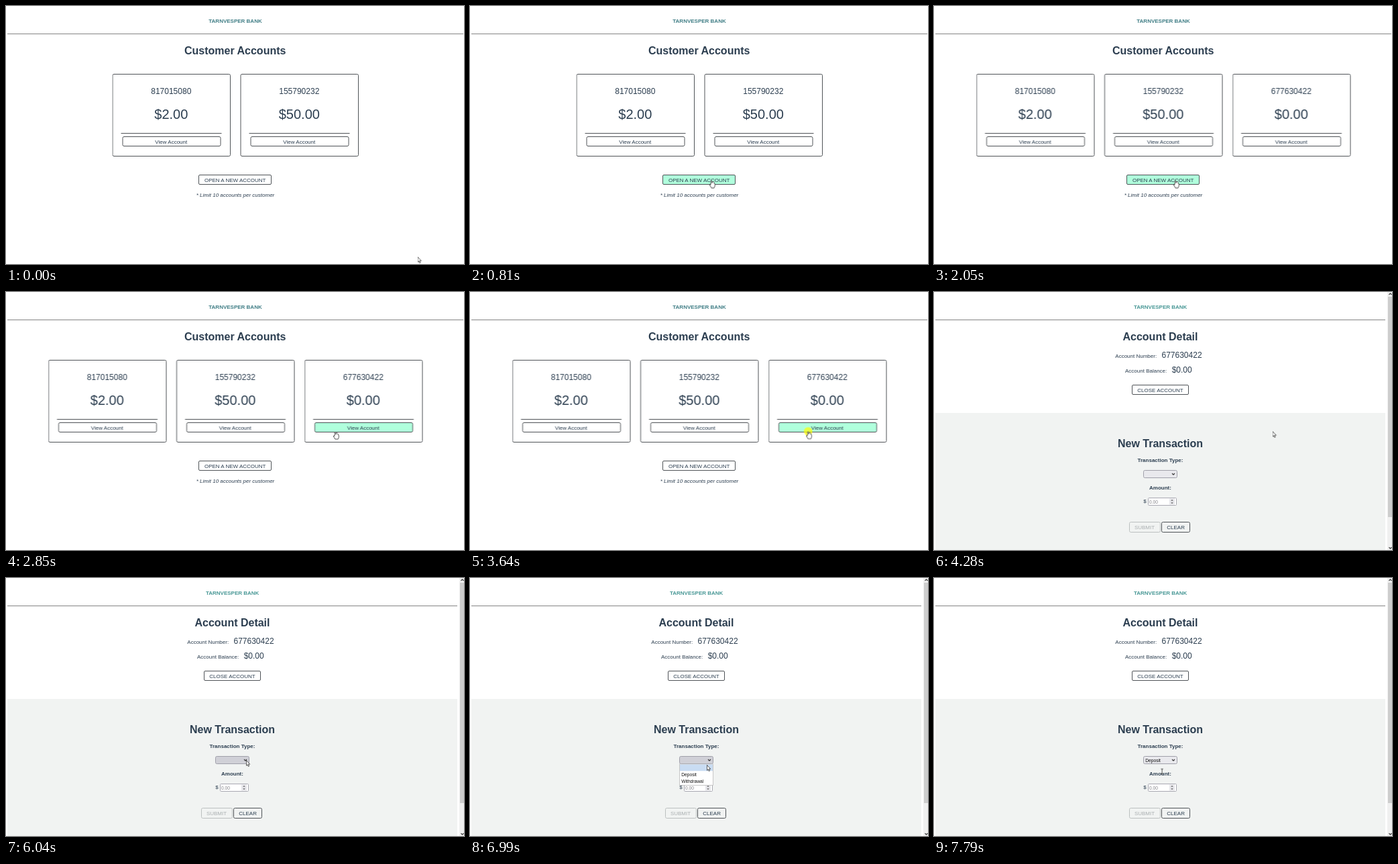
An HTML page for the animation above (8 s loop, 683 by 384 pixels).

```html
<!DOCTYPE html>
<html lang="en">
<head>
<meta charset="utf-8">
<title>Customer accounts</title>
<style>
html, body { margin: 0; width: 100%; height: 100%; overflow: hidden; background: #fff; }
svg { display: block; width: 683px; height: 384px; font: 8px "Liberation Sans", Arial, sans-serif; fill: #2c3e50; }
.mid { text-anchor: middle; }
.brand { font-weight: bold; fill: #3f7d85; }
.detail .brand { fill: #479795; }
h1, .title { font-size: 16px; font-weight: bold; }
.bold { font-weight: bold; }
.number { font-size: 12px; }
.money { font-size: 20px; }
.small { font-size: 6.67px; }
.rule { stroke: #858585; }
.box { fill: #fff; stroke: #505458; }
.clear { fill: none; }
.field { fill: #fff; stroke: #a9a9b2; }
.off { fill: #aaafb1; }
.off-box { fill: none; stroke: #bcc0c0; }
.chevron { fill: none; stroke: #333; stroke-width: 1.1; }

/* One percent of the loop is 80 ms. */
.accounts, .detail, .row, .third, .open, .view, .select, .popup, .mark, .chosen,
.pointer, .arrow, .hand, .beam, .click { animation: 8s step-end infinite; }
.accounts { animation-name: accounts; }
.detail { animation-name: detail; }
.row { animation-name: row; }
.third { animation-name: third; }
.open { animation-name: open; }
.view { animation-name: view; }
.select { fill: #e9e9ed; stroke: #a0a0aa; animation-name: select; }
.popup { animation-name: popup; }
.mark { fill: #c9dcf2; animation-name: mark; }
.chosen { animation-name: chosen; }
.pointer { animation-name: pointer; }
.arrow { animation-name: arrow; }
.hand { animation-name: hand; }
.beam { animation-name: chosen; }
.click { fill: #ff0; fill-opacity: .7; animation-name: click; }

@keyframes accounts { 0% { opacity: 1 } 49.625%, 100% { opacity: 0 } }
@keyframes detail { 0% { opacity: 0 } 49.625%, 100% { opacity: 1 } }
@keyframes row { 0% { transform: translateX(95.5px) } 25.625%, 100% { transform: none } }
@keyframes third { 0% { opacity: 0 } 25.625%, 100% { opacity: 1 } }
@keyframes open { 0%, 31.625%, 100% { fill: #fff } 8.125% { fill: #b0ffdc } }
@keyframes view { 0%, 100% { fill: #fff } 35.625% { fill: #b0ffdc } }
@keyframes select { 0%, 97.375%, 100% { fill: #e9e9ed } 73.375% { fill: #d0d0d7 } }
@keyframes popup { 0%, 97.375%, 100% { opacity: 0 } 77.375% { opacity: 1 } }
@keyframes mark { 0% { transform: none } 91.375%, 100% { transform: translateY(10px) } }
@keyframes chosen { 0% { opacity: 0 } 97.375%, 100% { opacity: 1 } }
@keyframes arrow {
  0%, 31.625%, 49.625% { opacity: 1 }
  8.125%, 35.625%, 97.375%, 100% { opacity: 0 }
}
@keyframes hand {
  0%, 31.625%, 49.625%, 100% { opacity: 0 }
  8.125%, 35.625% { opacity: 1 }
}
@keyframes click {
  0%, 18%, 47.625%, 79.5%, 100% { opacity: 0 }
  16.125%, 45.5%, 77.375% { opacity: 1 }
}
@keyframes pointer {
  0% { transform: translate(613.5px, 373px) }
  2.125% { transform: translate(597px, 365px) }
  4.125% { transform: translate(520px, 325px) }
  6.125% { transform: translate(430px, 282px) }
  8.125% { transform: translate(374px, 262px) }
  10.125% { transform: translate(360px, 259.5px) }
  31.625% { transform: translate(385px, 254px) }
  33.625% { transform: translate(442px, 233px) }
  35.625% { transform: translate(491px, 208px) }
  37.5% { transform: translate(503.5px, 207.5px) }
  41.375% { transform: translate(504.2px, 207.5px) }
  49.625% { transform: translate(504.5px, 207px) }
  59.5% { transform: translate(502px, 202px) }
  61.5% { transform: translate(494px, 199.5px) }
  63.5% { transform: translate(474px, 206px) }
  65.5% { transform: translate(446px, 219px) }
  67.5% { transform: translate(415px, 236px) }
  69.5% { transform: translate(385px, 251px) }
  71.5% { transform: translate(363.5px, 261px) }
  73.375% { transform: translate(358.5px, 270px) }
  75.5% { transform: translate(358px, 271px) }
  85.25% { transform: translate(357px, 273px) }
  87.375% { transform: translate(353px, 278px) }
  89.375% { transform: translate(348px, 283px) }
  91.375% { transform: translate(343px, 286.5px) }
  93.5%, 100% { transform: translate(340px, 287.3px) }
}
</style>
</head>
<body>
<svg viewBox="0 0 683 384">
  <defs>
    <g id="card">
      <rect class="box" x=".5" y="101.5" width="175.5" height="122" rx="2"/>
      <path class="rule" style="stroke:#505458" d="M13 189.5h150"/>
    </g>
    <rect id="button" x="15.5" y="194.5" width="146" height="14" rx="2"/>
  </defs>

  <g class="accounts">
    <text class="brand mid" x="342" y="25">TARNVESPER BANK</text>
    <path class="rule" d="M2 41.5H682"/>
    <text class="title mid" x="341.7" y="72">Customer Accounts</text>
    <g class="row mid">
      <g transform="translate(63)">
        <use href="#card"/><use href="#button" class="box"/>
        <text class="number" x="87.8" y="130.5">817015080</text>
        <text class="money" x="87.8" y="168">$2.00</text>
        <text x="87.8" y="204.5">View Account</text>
      </g>
      <g transform="translate(254)">
        <use href="#card"/><use href="#button" class="box"/>
        <text class="number" x="87.8" y="130.5">155790232</text>
        <text class="money" x="87.8" y="168">$50.00</text>
        <text x="87.8" y="204.5">View Account</text>
      </g>
      <g class="third"><g transform="translate(445)">
        <use href="#card"/><use href="#button" class="box view"/>
        <text class="number" x="87.8" y="130.5">677630422</text>
        <text class="money" x="87.8" y="168">$0.00</text>
        <text x="87.8" y="204.5">View Account</text>
      </g></g>
    </g>
    <rect class="box open" x="287.5" y="251.5" width="108" height="14" rx="1.5"/>
    <text class="mid" x="341.7" y="261.5">OPEN A NEW ACCOUNT</text>
    <text class="mid" x="342" y="283.5" font-style="italic">* Limit 10 accounts per customer</text>
  </g>

  <g class="detail">
    <text class="brand mid" x="337.7" y="25">TARNVESPER BANK</text>
    <path class="rule" d="M2 41.5H673"/>
    <text class="title mid" x="337.5" y="72">Account Detail</text>
    <text x="270.3" y="98">Account Number:</text>
    <text class="number" x="339.5" y="98">677630422</text>
    <text x="285" y="120">Account Balance:</text>
    <text class="number" x="354.7" y="120">$0.00</text>
    <rect class="box" x="295.5" y="138.5" width="84" height="14" rx="1.5"/>
    <text class="mid" x="337.5" y="148.5">CLOSE ACCOUNT</text>

    <path fill="#f1f3f2" d="M2 180H673V384H2z"/>
    <text class="title mid" x="337.5" y="231">New Transaction</text>
    <text class="bold mid" x="337.5" y="253">Transaction Type:</text>
    <rect class="select" x="312.5" y="265.5" width="50" height="11" rx="2"/>
    <path class="chevron" d="M355 270l2 2 2-2"/>
    <text class="small chosen" x="315.3" y="273.5" fill="#111">Deposit</text>
    <text class="bold mid" x="337.5" y="294">Amount:</text>
    <text x="312.3" y="314">$</text>
    <rect class="field" x="319.5" y="306.5" width="42" height="11" rx="1"/>
    <text class="small" x="321" y="314.5" fill="#85858a">0.00</text>
    <path fill="#e6e6ea" d="M351 307.5h8v9h-8z"/>
    <path fill="#666" d="M353.3 310.8l1.7-2 1.7 2zM353.3 313.3l1.7 2 1.7-2z"/>
    <rect class="off-box" x="291.5" y="342.5" width="46" height="15" rx="2"/>
    <text class="off mid" x="314" y="353">SUBMIT</text>
    <rect class="box clear" x="339.5" y="342.5" width="42" height="15" rx="2"/>
    <text class="mid" x="360.6" y="353">CLEAR</text>

    <path fill="#f0f0f0" d="M676 0h7v384h-7z"/>
    <path fill="#cdcdcd" d="M677 7h6v328h-6z"/>
    <path class="chevron" stroke-width=".9" d="M678.5 4l2-2 2 2M678.5 380l2 2 2-2"/>

    <g class="popup small">
      <rect x="312.5" y="277" width="50" height="31.5" fill="#fff" stroke="#bbb" stroke-width=".8"/>
      <rect class="mark" x="313" y="277.5" width="49" height="9.7"/>
      <text x="315.3" y="294.5" fill="#111">Deposit</text>
      <text x="315.3" y="304.8" fill="#111">Withdrawal</text>
    </g>
  </g>

  <g class="pointer">
    <circle class="click" r="6.3"/>
    <g fill="#fff" stroke="#222" stroke-width=".75" stroke-linejoin="round">
      <path class="arrow" d="M.4 .4V8.3L2.1 6.7 3.3 9.5 4.6 8.9 3.4 6.2H5.7z"/>
      <path class="hand" d="M-.9 6.4V1Q0-.3.9 1V4Q2-.1+3.6 2.4 4 2.9 4 4.6Q5.3 4.2 5.3 5.6V8Q5 9.6 4.2 11H-.2Q-1.2 9-2.7 7Q-2.7 5.2-.9 6.4z"/>
    </g>
    <path class="beam" fill="none" stroke="#333" stroke-width=".8" d="M-1.7-3H1.9M.1-3V4.2M-1.7 4.2H1.9"/>
  </g>
</svg>
</body>
</html>
```
